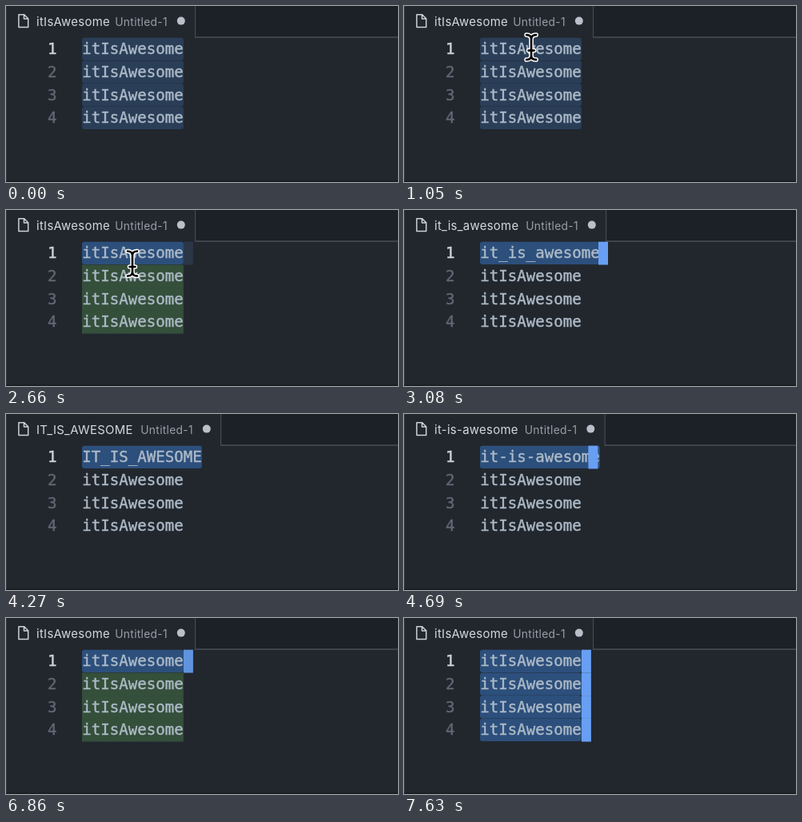
Write an HTML page that moves like this. It is 490x220 px and loops after 8 s.

```html
<!DOCTYPE html>
<html lang="en">
<head>
<meta charset="utf-8">
<title>Changing case in an editor</title>
<style>
html, body { margin: 0; width: 100%; height: 100%; overflow: hidden; background: #22272e; }
svg { display: block; }
text { white-space: pre; }
.code { font: 19.1px "DejaVu Sans Mono", monospace; fill: #adbac7; stroke: #adbac7; stroke-width: 0.4; }
.num { fill: #606874; stroke: #606874; }
.num.on { fill: #cdd5de; stroke: #cdd5de; }
.name { font: 14.9px Inter, sans-serif; letter-spacing: 0.3px; fill: #d3d9e0; }
.path { font: 13.8px Inter, sans-serif; letter-spacing: 0.3px; fill: #969fa9; }
</style>
</head>
<body>
<svg id="stage" width="490" height="220" viewBox="0 0 490 220"></svg>
<script>
const LOOP = 8000, TICK = 70;
const LEFT = 95.3, TOP = 39.7, CHAR = 11.5, ROW = 28.7, BASE = 20.6;
const FOCUSED = '#2c4f7c', BLURRED = '#2a3e58';
const stage = document.getElementById('stage');

function add(tag, attrs, parent = stage, text) {
  const el = document.createElementNS('http://www.w3.org/2000/svg', tag);
  set(el, attrs);
  if (text) el.textContent = text;
  parent.appendChild(el);
  return el;
}
function set(el, attrs) {
  for (const key in attrs) el.setAttribute(key, attrs[key]);
}
const show = (el, on) => set(el, { visibility: on ? 'visible' : 'hidden' });
const clamp = v => Math.min(1, Math.max(0, v));
const ease = v => (v = clamp(v), v * v * (3 - 2 * v));
const mix = (a, b, v) => a + (b - a) * v;
const rowY = i => TOP + i * ROW;

// Window and tab
add('rect', { width: 490, height: 220, fill: '#22272e' });
const bar = add('rect', { y: 0, height: 39, fill: '#1c2128' });
const barLine = add('rect', { y: 38.3, height: 1.5, fill: '#484e57' });
const tabEdge = add('rect', { y: 0, width: 1.2, height: 39.8, fill: '#444a53' });
add('rect', { width: 1, height: 220, fill: '#343a42' });
add('rect', { y: 218.6, width: 490, height: 1.4, fill: '#181c21' });
add('path', {
  d: 'M15.9 10.7h6.8l5 5v10.8H15.9zM22.5 10.7v5.2h5.2',
  fill: 'none', stroke: '#ccd2d9', 'stroke-width': 1.5, 'stroke-linejoin': 'round'
});
const name = add('text', { x: 38, y: 24.6, class: 'name' });
const path = add('text', { y: 24.6, class: 'path' }, stage, 'Untitled-1');
const dot = add('circle', { cy: 18.6, r: 5, fill: '#b9c0c9' });

// Editor rows
const marks = [], lines = [], carets = [];
for (let i = 0; i < 4; i++) marks.push(add('rect', { x: LEFT - 0.3 }));
for (let i = 0; i < 4; i++) {
  const y = Math.round(rowY(i) + BASE);
  add('text', { x: 52, y, class: i ? 'code num' : 'code num on' }, stage, String(i + 1));
  lines.push(add('text', { x: LEFT, y, class: 'code' }, stage, 'itIsAwesome'));
}
for (let i = 0; i < 4; i++) {
  carets.push(add('rect', { y: rowY(i), width: 12, height: ROW + 0.1, fill: '#689ff3' }));
}

// I-beam pointer
const beam = add('g', { fill: 'none', 'stroke-linecap': 'round', 'stroke-linejoin': 'round' });
for (const [stroke, width] of [['#fff', 5.6], ['#000', 2.6]]) {
  add('path', {
    d: 'M-6-15.5Q0-15.5 0-10Q0-15.5 6-15.5M0-10V10M-6 15.5Q0 15.5 0 10Q0 15.5 6 15.5M-3.5 4H3.5',
    stroke, 'stroke-width': width
  }, beam);
}

// Start time, first line, extra tab width
const cases = [
  [0, 'itIsAwesome', 0],
  [2940, 'it_is_awesome', 16],
  [3990, 'IT_IS_AWESOME', 32],
  [4410, 'ItIsAwesome', 0.5],
  [4620, 'it-is-awesome', 14.5],
  [5040, 'itIsAwesome', 0]
];
// Start, end, caret column before and after
const moves = [
  [1050, 1150, 11, 5],
  [1260, 1400, 5, 11],
  [2940, 3110, 11, 13],
  [4360, 4470, 13, 11],
  [4620, 4790, 11, 13],
  [5040, 5210, 13, 11]
];
// Start, end, caret opacity reached
const fades = [
  [1995, 2175, 0], [2620, 2800, 1],
  [3675, 3855, 0], [4409, 4410, 1],
  [5775, 5955, 0], [6465, 6590, 1],
  [6825, 7005, 0], [7139, 7140, 1]
];
const matches = [[1400, 2940], [4480, 4620], [5250, 8000]];
const picks = [1260, 7140, 7350, 7630];

function pointer(t) {
  const up = ease((t - 690) / 230), back = ease((t - 920) / 220);
  return [mix(mix(184, 161, up), 158, back), mix(mix(193, 25, up), 67, back)];
}

function draw(t) {
  const [, word, extra] = cases.filter(c => t >= c[0]).pop();
  const edge = 236 + extra;
  name.textContent = lines[0].textContent = word;
  set(path, { x: 136.3 + extra });
  set(dot, { cx: 218.8 + extra });
  set(tabEdge, { x: edge });
  set(bar, { x: edge, width: 490 - edge });
  set(barLine, { x: edge, width: 490 - edge });

  let col = 11, alpha = 1;
  for (const [a, b, from, to] of moves) if (t >= a) col = mix(from, to, ease((t - a) / (b - a)));
  for (const [a, b, to] of fades) if (t >= a) alpha = mix(1 - to, to, ease((t - a) / (b - a)));

  const matched = matches.some(([a, b]) => t >= a && t < b);
  for (let i = 0; i < 4; i++) {
    const blurred = t < 1120, picked = blurred || t >= picks[i];
    const count = i ? 11 : word.length;
    show(marks[i], picked || (i && matched));
    set(marks[i], {
      y: rowY(i),
      width: count * CHAR + 0.4,
      height: picked ? ROW - 0.4 : ROW + 0.1,
      rx: picked ? 3 : 0,
      fill: blurred ? BLURRED : picked ? FOCUSED : '#344f3a'
    });
    show(carets[i], !blurred && (i === 0 || picked));
    set(carets[i], { x: LEFT + col * CHAR + 0.1, opacity: alpha });
  }

  show(beam, t >= 700 && t < 2940);
  set(beam, { transform: `translate(${pointer(t)})` });
}

const start = performance.now();
function frame() {
  const t = (performance.now() - start) % LOOP;
  draw(Math.floor(t / TICK) * TICK);
  requestAnimationFrame(frame);
}
frame();
</script>
</body>
</html>
```
